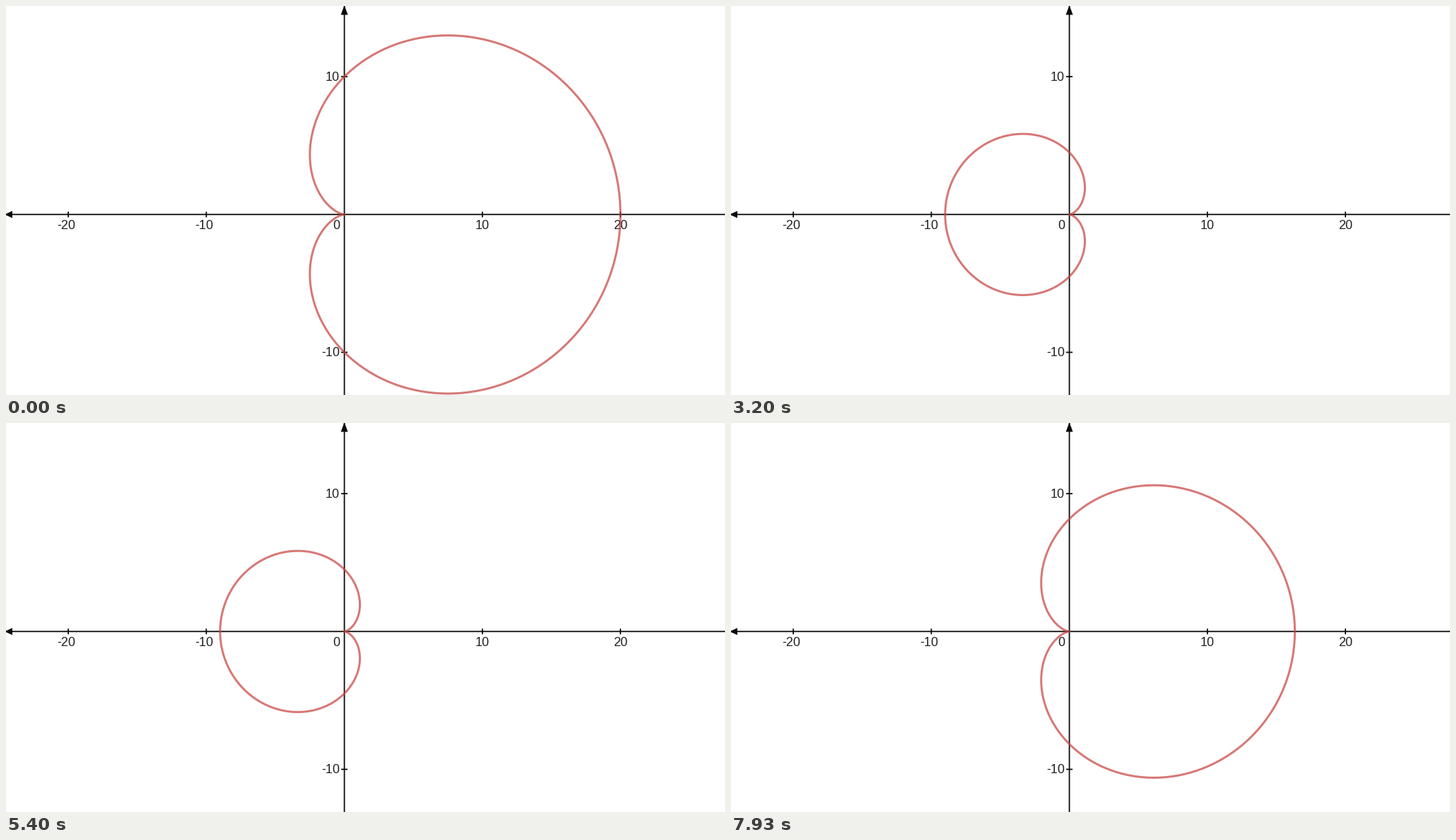
Recreate the animation shown at these times as a matplotlib script. Size 1017x551 px, loop 8 s.

```python
import numpy as np
import matplotlib.pyplot as plt
from matplotlib.animation import FuncAnimation
from matplotlib.patches import Polygon

W, H, DPI = 1017, 551, 64
PT = 72 / DPI                 # points per pixel
CX, CY, UNIT = 478.6, 295.3, 19.525
LOOP, INTERVAL, FPS = 8000, 20, 15
INK = "#0a0a0a"

fig = plt.figure(figsize=(W / DPI, H / DPI), dpi=DPI, facecolor="white")
ax = fig.add_axes([0, 0, 1, 1])
ax.set_xlim(0, W)
ax.set_ylim(H, 0)
ax.axis("off")


def line(x0, y0, x1, y1, width=1.8):
    ax.plot([x0, x1], [y0, y1], color=INK, lw=width * PT,
            solid_capstyle="butt", snap=False)


def label(x, y, text, align):
    ax.text(x, y, text, family="Liberation Sans", size=18 * PT, color="#222222",
            ha=align, va="baseline")


def draw_axes():
    line(0, CY, W, CY)
    line(CX, 0, CX, H)
    ax.add_patch(Polygon([(-2, CY), (9, CY - 5), (9, CY + 5)], color=INK, lw=0))
    ax.add_patch(Polygon([(CX, -1), (CX - 5, 12.5), (CX + 5, 12.5)],
                         color=INK, lw=0))
    for n in (-20, -10, 10, 20):
        x = CX + n * UNIT
        line(x, CY - 4, x, CY + 4)
        label(x - (3 if n < 0 else 0), 316, str(n), "center")
    for n in (-10, 10):
        y = CY - n * UNIT
        line(CX - 4.5, y, CX + 4.5, y)
        label(472, y + 5.5, str(n), "right")
    label(472.5, 316, "0", "right")


draw_axes()

theta = np.linspace(0, 2 * np.pi, 401)
unit_x = (1 + np.cos(theta)) * np.cos(theta) * UNIT
unit_y = (1 + np.cos(theta)) * np.sin(theta) * UNIT
curve, = ax.plot([], [], color="#c74440", alpha=0.72, lw=3 * PT, zorder=5,
                 solid_joinstyle="round")

ARROW = np.array([(0, 0), (0, 14), (3.2, 11), (5.3, 16.5), (7.6, 15.5),
                  (5.3, 10.3), (9.6, 10.3)])
cursor = Polygon(ARROW, facecolor="white", edgecolor="#222222", lw=1 * PT,
                 zorder=6, visible=False)
ax.add_patch(cursor)

# (first step, last step, tip position) of each brief pointer visit
VISITS = [(56, 56, (-3, 300)), (63, 63, (772, -5)), (101, 103, (901.3, 182.7))]


def size_at(t):
    """Scale of r = a(1 + cos): a rest at 10, then a linear swing to -10 and back."""
    return min(10, -10 + abs(t - 4300) / 200)


def update(i):
    step = (i * INTERVAL + 14) * FPS // 1000
    a = size_at(step * 1000 / FPS)
    curve.set_data(CX + a * unit_x, CY - a * unit_y)
    cursor.set_visible(False)
    for first, last, tip in VISITS:
        if first <= step <= last:
            cursor.set_xy(ARROW + tip)
            cursor.set_visible(True)
    return curve, cursor


anim = FuncAnimation(fig, update, frames=LOOP // INTERVAL, interval=INTERVAL,
                     repeat=True, repeat_delay=0, blit=False)
plt.show()
```
